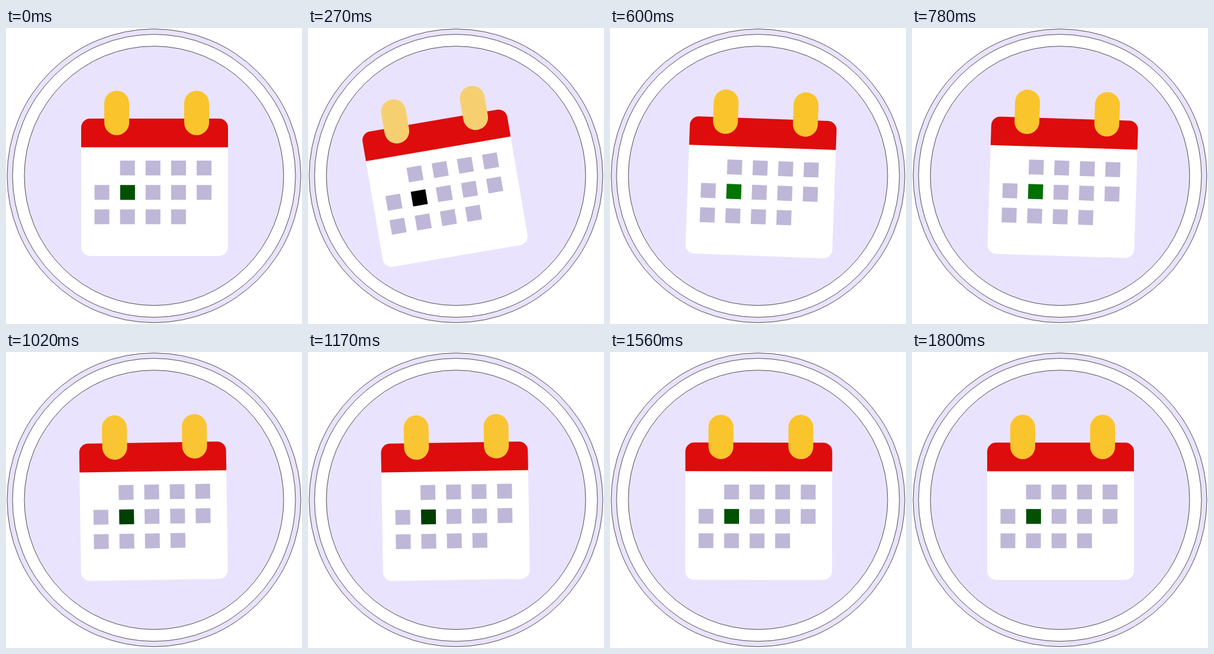
An HTML page with a canvas for the animation above (3630 ms loop, 500 px wide and 500 px high).

```html
<!DOCTYPE html>
<html lang="en">
<head>
<meta charset="utf-8">
<title>Swinging calendar</title>
<style>
html, body { margin: 0; width: 100%; height: 100%; overflow: hidden; background: #fff; }
canvas { display: block; width: 100vw; height: 100vh; }
</style>
</head>
<body>
<canvas id="stage" width="500" height="500"></canvas>
<script>
const ctx = document.getElementById('stage').getContext('2d');
const LOOP = 3630, STEP = 30, SWING_END = 1800;
const LILAC = '#eae3fd';
const PIVOT = { x: 251, y: 385 };

// Damped swing: [time in ms, angle in degrees]
const SWING = [
  [0, 0], [180, -11.2], [270, -9.7], [450, -0.83], [650, 2.5], [780, 1.8],
  [910, 0], [1020, -0.87], [1150, -1], [1320, -0.5], [1480, 0], [1620, 0.1], [1800, 0]
];

function slope(i) {
  const a = SWING[Math.max(i - 1, 0)];
  const b = SWING[Math.min(i + 1, SWING.length - 1)];
  return (b[1] - a[1]) / (b[0] - a[0]);
}

// Cubic Hermite curve through the swing points
function swingAngle(t) {
  if (t >= SWING_END) return 0;
  let i = 0;
  while (t >= SWING[i + 1][0]) i++;
  const [t0, a0] = SWING[i], [t1, a1] = SWING[i + 1];
  const d = t1 - t0, u = (t - t0) / d, v = 1 - u;
  return (1 + 2 * u) * v * v * a0 + u * v * v * d * slope(i)
    + u * u * (3 - 2 * u) * a1 - u * u * v * d * slope(i + 1);
}

function disc(r, fill) {
  ctx.beginPath();
  ctx.arc(250, 249.7, r, 0, Math.PI * 2);
  ctx.fillStyle = fill;
  ctx.fill();
  ctx.strokeStyle = '#222';
  ctx.lineWidth = 0.8;
  ctx.stroke();
}

function rounded(x, y, w, h, r, fill) {
  ctx.beginPath();
  ctx.roundRect(x, y, w, h, r);
  ctx.fillStyle = fill;
  ctx.fill();
}

function drawDays(green) {
  for (let row = 0; row < 3; row++) {
    for (let col = 0; col < 5; col++) {
      if ((row === 0 && col === 0) || (row === 2 && col === 4)) continue;
      const x = 149.5 + col * 43.15, y = 224 + row * 41.2;
      ctx.fillStyle = '#bfb7d7';
      ctx.fillRect(x, y, 25, 25);
      if (row === 1 && col === 1) {
        ctx.fillStyle = `rgb(0,${green},0)`;
        ctx.fillRect(x + 0.3, y + 0.1, 24.9, 25);
      }
    }
  }
}

function drawCalendar(angle) {
  // Colours follow the swing
  const green = Math.max(0, Math.round(80 + 18 * angle));
  const pale = Math.max(0, -angle);
  const yellow = `rgb(${250 - 0.4 * pale},${196 + 1.2 * pale},${44 + 7 * pale})`;

  ctx.save();
  ctx.translate(PIVOT.x, PIVOT.y);
  ctx.rotate(angle * Math.PI / 180);
  ctx.translate(-PIVOT.x, -PIVOT.y);
  rounded(127, 190, 248, 195, [0, 0, 15, 15], '#fff');
  rounded(127, 153, 248, 48.5, [15, 15, 0, 0], '#de0c0c');
  for (const x of [166, 301]) rounded(x, 106, 42, 75, 21, yellow);
  drawDays(green);
  ctx.restore();
}

const start = performance.now();

function draw(now) {
  const t = Math.max(0, now - start) % LOOP;
  ctx.fillStyle = '#fff';
  ctx.fillRect(0, 0, 500, 500);
  disc(248, LILAC);
  disc(239, '#fff');
  disc(219, LILAC);
  drawCalendar(swingAngle(Math.floor(t / STEP) * STEP));
  requestAnimationFrame(draw);
}
draw(start);
</script>
</body>
</html>
```
